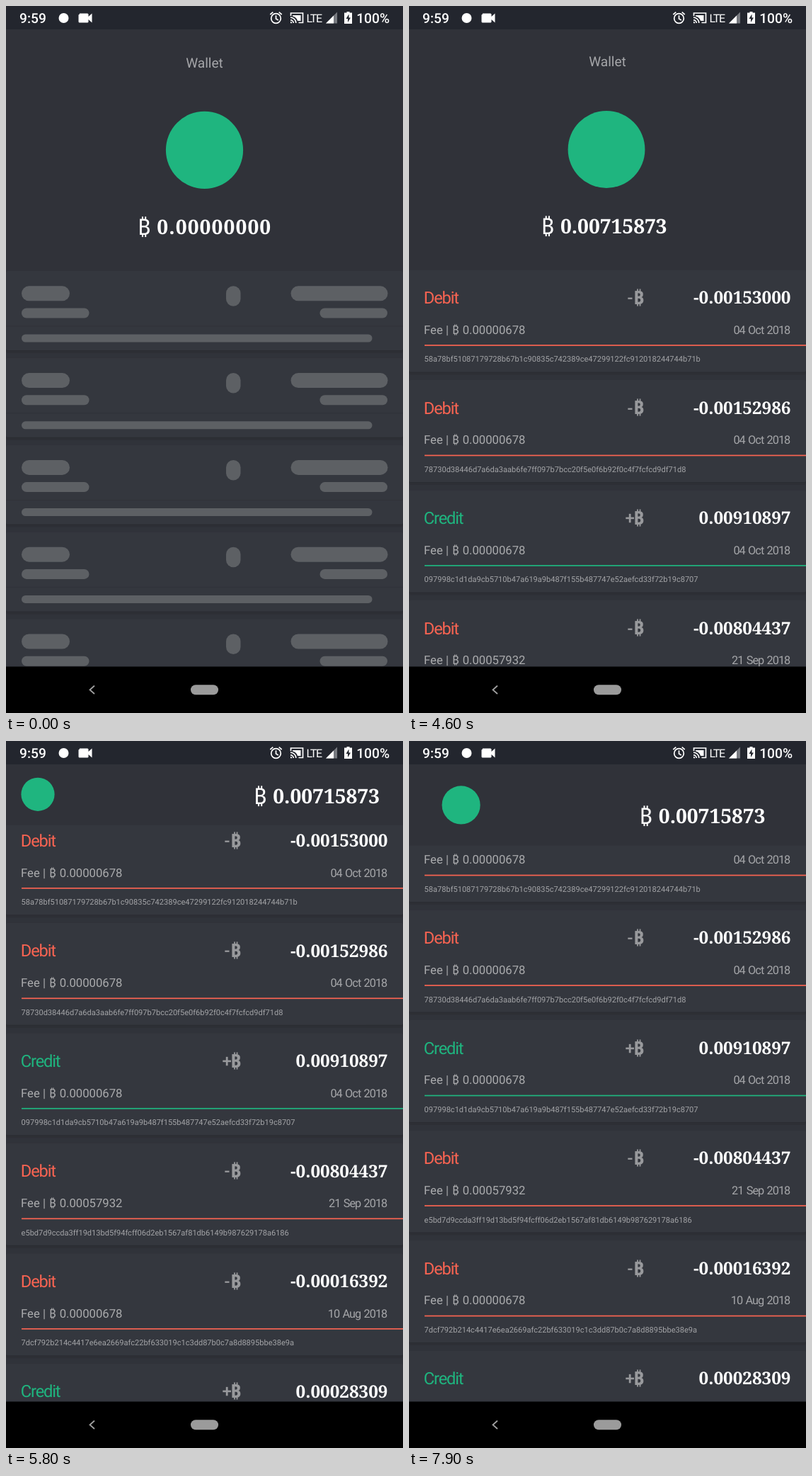
An HTML page that plays this animation: 561 px wide and 998 px high, repeating every 8000 ms.

```html
<!DOCTYPE html>
<html lang="en">
<head>
<meta charset="utf-8">
<title>Wallet</title>
<style>
  html, body { margin: 0; width: 100%; height: 100%; overflow: hidden; background: #000; }
  svg { display: block; width: 100%; height: 100%; text-rendering: geometricPrecision; }
  text { font-family: Roboto, "Noto Sans", Inter, "DejaVu Sans", sans-serif; white-space: pre; }
  .kind { font-size: 23.7px; letter-spacing: -.05em; }
  .sign { font-size: 24px; font-weight: 500; fill: #98999c; }
  .unit { font-size: 26.5px; font-weight: 700; fill: #98999c; }
  .sum { font: 700 24.4px "Noto Serif", "DejaVu Serif", serif; fill: #fff; }
  .fee { font-size: 16.7px; fill: #aaabad; }
  .date { font-size: 16.3px; letter-spacing: -.06em; word-spacing: .08em; fill: #a5a6a9; }
  .hash { font-size: 11.05px; fill: #a3a4a7; }
  .coin { font-size: 31.5px; fill: #fff; }
  .total { font: 600 28.3px "Noto Serif", "DejaVu Serif", serif; fill: #fff; }
  .loading { letter-spacing: .04em; }
  .title { font-size: 19.1px; fill: #a6a7aa; }
  .status { font-size: 19.2px; font-weight: 500; fill: #fff; }
  .lte { font-size: 16px; letter-spacing: -.075em; fill: #fff; }
  .end { text-anchor: end; }
  .mid { text-anchor: middle; }
</style>
</head>
<body>
<svg viewBox="0 0 561 998" preserveAspectRatio="none">
  <rect width="561" height="998" fill="#30333a"/>
  <g id="skeleton"></g>
  <g id="list"></g>

  <rect id="header" y="33" width="561" height="341" fill="#303239"/>
  <text id="title" class="title mid" x="280.5">Wallet</text>
  <circle id="logo" fill="#1fb57f"/>
  <g id="balance">
    <text class="coin" x="-2" y="1">₿</text>
    <text id="total" class="total" x="25.3"></text>
  </g>

  <rect width="561" height="33" fill="#23262e"/>
  <text class="status" x="19" y="24">9:59</text>
  <circle cx="81.5" cy="17" r="7" fill="#fff"/>
  <path d="M104 10.5h11q1.5 0 1.5 1.5v3l5-4.5v13l-5-4.5v3q0 1.5-1.5 1.5h-11q-1.5 0-1.5-1.5v-9q0-1.5 1.5-1.5z" fill="#fff"/>
  <g fill="none" stroke="#fff" stroke-width="1.7">
    <circle cx="381.5" cy="17.5" r="6.8"/>
    <path d="M381.5 13.3v4.7l3.3 2M373.3 12l4-3.3M389.7 12l-4-3.3"/>
    <path d="M402.5 14v-4h17v13.5h-6M402 16.2a7.8 7.8 0 0 1 7.8 7.8M402 19.8a4.2 4.2 0 0 1 4.2 4.2"/>
  </g>
  <path d="M402 22a2.3 2.3 0 0 1 2.3 2.3H402zM405 13h11.5v8H412a9 9 0 0 0-7-6.5z" fill="#fff"/>
  <text class="lte" x="424.5" y="22.5">LTE</text>
  <path d="M452 24.5L468 8.5v16z" fill="#777a80"/>
  <path d="M452 24.5L463 13.5v11z" fill="#fff"/>
  <path d="M481.5 9.5V8h4v1.5h3.5V25h-11V9.5z" fill="#fff"/>
  <path d="M484.5 11.5l-4 6.5h2.5v5l4-6.5h-2.5z" fill="#23262e"/>
  <text class="status end" x="542" y="24">100%</text>

  <rect y="932.5" width="561" height="65.5"/>
  <path d="M125 959.5l-6.5 5.7 6.5 5.8" fill="none" stroke="#a0a0a0" stroke-width="1.8"/>
  <rect x="261" y="958.3" width="39" height="14" rx="7" fill="#9b9b9b"/>
</svg>
<script>
const LOOP = 8000, STEP = 100, LOADED = 700;
const TOP = 374, BAR = 33, COLLAPSE = 255, REST = 319.5;
const RED = '#f96452', GREEN = '#1fb57f';

const $ = id => document.getElementById(id);
const rect = (x, y, w, h, r, fill) =>
  `<rect x="${x}" y="${y}" width="${w}" height="${h}" rx="${r}" fill="${fill}"/>`;
const text = (cls, x, y, s, fill) =>
  `<text class="${cls}" x="${x}" y="${y}"${fill ? ` fill="${fill}"` : ''}>${s}</text>`;
const group = (y, body) => `<g transform="translate(0 ${y})">${body}</g>`;

const card = h =>
  rect(0, 1, 561, h + 3, 3, '#2d2f35') +
  rect(0, 0, 561, h + 1, 2, '#2a2c32') +
  rect(0, 0, 561, h, 2, '#34373e');

const pill = (x, y, w, h) => rect(x, y, w, h, Math.min(w, h) / 2, '#5d6064');

const placeholder = i => group(TOP + i * 122.8,
  card(112) +
  rect(0, 77.5, 561, 1, 0, '#303239') +
  pill(22, 21.3, 68, 21) + pill(22, 52.5, 95.5, 14) +
  pill(311, 21.3, 20.5, 28.5) +
  pill(402.5, 21.3, 137, 21) + pill(443.5, 52.5, 95.5, 14) +
  pill(22, 89.5, 495.5, 11));

const payments = [
  ['-0.00153000', '0.00000678', '04 Oct 2018', '58a78bf51087179728b67b1c90835c742389ce47299122fc912018244744b71b'],
  ['-0.00152986', '0.00000678', '04 Oct 2018', '78730d38446d7a6da3aab6fe7ff097b7bcc20f5e0f6b92f0c4f7fcfcd9df71d8'],
  ['0.00910897', '0.00000678', '04 Oct 2018', '097998c1d1da9cb5710b47a619a9b487f155b487747e52aefcd33f72b19c8707'],
  ['-0.00804437', '0.00057932', '21 Sep 2018', 'e5bd7d9ccda3ff19d13bd5f94fcff06d2eb1567af81db6149b987629178a6186'],
  ['-0.00016392', '0.00000678', '10 Aug 2018', '7dcf792b214c4417e6ea2669afc22bf633019c1c3dd87b0c7a8d8895bbe38e9a'],
  ['0.00028309', '0.00000904', '09 Aug 2018', '']
];

const payment = ([sum, fee, date, hash], i) => {
  const debit = sum[0] === '-', color = debit ? RED : GREEN;
  return group(TOP + i * 155.5,
    card(144) +
    text('kind', 20.8, 47.7, debit ? 'Debit' : 'Credit', color) +
    text('sign end', debit ? 316.5 : 319, 47.7, debit ? '-' : '+') +
    text('unit', 317, 48.6, '₿') +
    text('sum end', 539.5, 47.9, sum) +
    text('fee', 21, 90.3, 'Fee |') +
    text('fee', 61, 90.3, '₿') +
    text('fee', 75.7, 90.3, fee) +
    text('date end', 538.3, 90.3, date) +
    rect(22, 105.7, 539, 1.7, 0, color) +
    text('hash', 21.6, 130, hash));
};

$('skeleton').innerHTML = [0, 1, 2, 3, 4].map(placeholder).join('');
$('list').innerHTML = payments.map(payment).join('');

// Scroll offset: time, position, velocity (px/ms)
const scrollKeys = [
  [4500, 0, 0], [4600, 1.6, .05], [5400, 193, .26], [6200, 312.5, .06], [6700, 324, 0],
  [7000, 324, 0], [7400, REST, 0], [7500, REST, 0], [7900, 291, -.12]
];

function hermite(keys, t) {
  if (t <= keys[0][0]) return keys[0][1];
  const i = keys.findIndex(k => t <= k[0]);
  if (i < 0) return keys[keys.length - 1][1];
  const [t0, a, va] = keys[i - 1], [t1, b, vb] = keys[i];
  const d = t1 - t0, u = (t - t0) / d, w = 1 - u;
  return w * w * ((1 + 2 * u) * a + u * d * va) + u * u * ((3 - 2 * u) * b - w * d * vb);
}

function render(time) {
  const t = Math.floor(time % LOOP / STEP) * STEP;
  const loaded = t >= LOADED;
  const offset = hermite(scrollKeys, t);
  // Scrolling back opens the header before the list moves
  const closed = t < 7000 ? Math.min(offset, COLLAPSE) : COLLAPSE - Math.max(0, REST - offset);
  const p = closed / COLLAPSE, lag = p * p * (1 - p);

  $('skeleton').style.display = loaded ? 'none' : '';
  $('list').style.display = loaded ? '' : 'none';
  $('list').setAttribute('transform', `translate(0 ${-offset})`);
  $('header').setAttribute('height', TOP - BAR - closed);
  $('title').setAttribute('y', 87 - closed);

  const logo = $('logo');
  logo.setAttribute('cx', 280.5 - 235.5 * p + 26 * lag);
  logo.setAttribute('cy', 203.3 - 128 * p + 9 * lag);
  logo.setAttribute('r', 54.6 - 31 * p);

  const x = 188 + 164 * p - 62 * p * (1 - p);
  const y = 322.2 - 234 * p + 24 * lag;
  $('balance').setAttribute('transform', `translate(${x} ${y})`);
  const total = $('total');
  total.textContent = loaded ? '0.00715873' : '0.00000000';
  total.classList.toggle('loading', !loaded);
}

const start = performance.now();
function tick() {
  render(performance.now() - start);
  requestAnimationFrame(tick);
}
tick();
</script>
</body>
</html>
```
